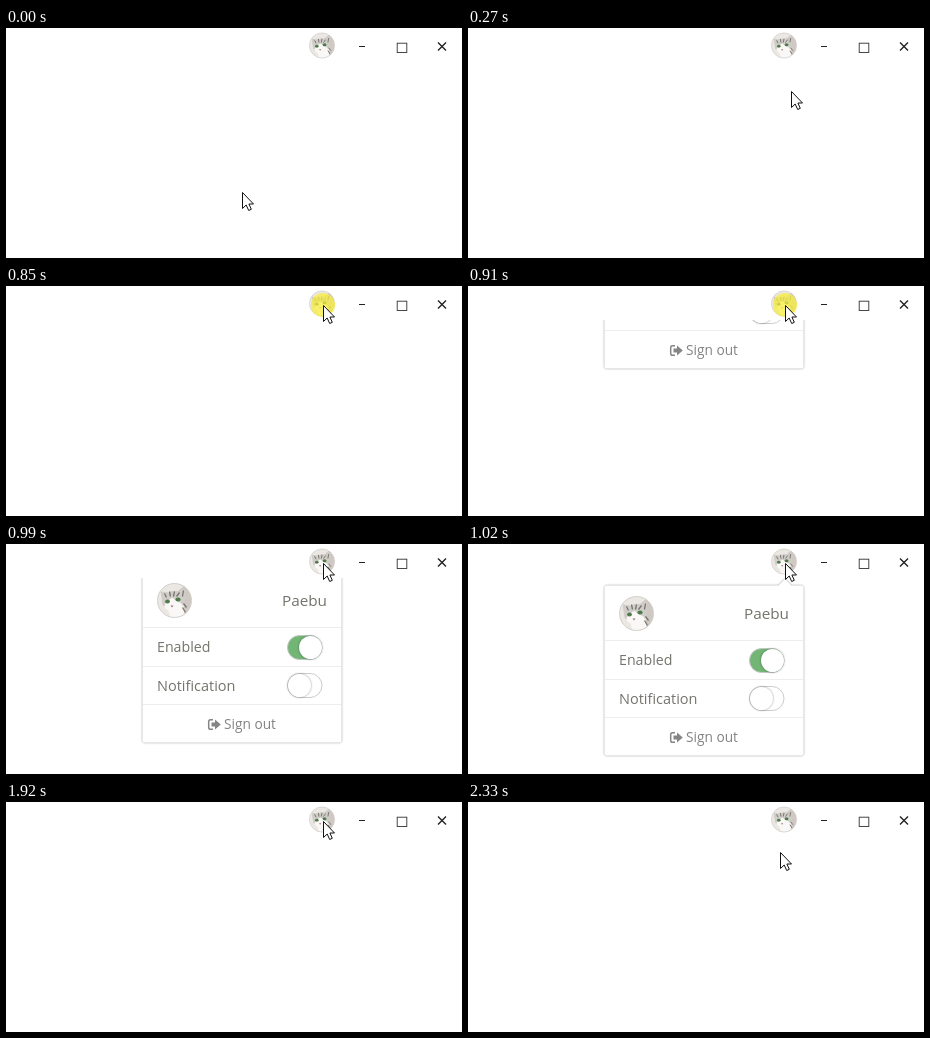
These frames come from a looping animation (456 by 230 pixels, 2540 ms). An HTML page:

```html
<!DOCTYPE html>
<html lang="en">
<head>
<meta charset="utf-8">
<title>Account menu</title>
<style>
  html, body { margin: 0; width: 100%; height: 100%; overflow: hidden; background: #fff; }
  svg { display: block; width: 100%; height: 100%; }
  text { font-family: "Open Sans", "Noto Sans", sans-serif; fill: #74736c; }
  .panel { filter: drop-shadow(0 0 1.3px rgba(0, 0, 0, .4)); }
  .knob { fill: #fff; filter: drop-shadow(0 .5px 1px rgba(0, 0, 0, .4)); }
</style>
</head>
<body>
<svg viewBox="0 0 456 230">
  <defs>
    <clipPath id="round"><circle r="17"/></clipPath>
    <clipPath id="below"><rect y="34" width="456" height="196"/></clipPath>
    <g id="avatar">
      <g clip-path="url(#round)">
        <rect x="-17" y="-17" width="34" height="34" fill="#ebe7e3"/>
        <path d="M3 -9L11 -16L17 -6V17H6L10 4Z" fill="#cfc8c3"/>
        <path d="M-14 -9L-6 -8Q0 -11 5 -9L9 -14L11 -3Q11 6 3 9Q-7 11 -12 4Z" fill="#d0cdc9"/>
        <path d="M-6 0Q-2 -5 1 0L7 3Q12 11 9 17H-4L-6 10Q-12 7 -9 3Z" fill="#faf8f6"/>
        <path d="M-10 -7L-8 -3M-5 -9L-4 -4M0 -9L-1 -4M5 -8L2 -4M9 -10L8 -4M9 3L12 7M8 7L11 12" stroke="#777470" stroke-width="1.3"/>
        <ellipse cx="-7" cy="1" rx="2.4" ry="2" fill="#4f7a4c"/>
        <ellipse cx="3.5" cy="-1" rx="2.6" ry="2.1" fill="#4f7a4c"/>
        <path d="M-4 5H-1L-2.500 7Z" fill="#8d7771"/>
      </g>
      <circle r="17" fill="none" stroke="#d3cfcb"/>
    </g>
  </defs>

  <g fill="none" stroke="#222">
    <path d="M353 18.5H359"/>
    <rect x="391.2" y="15.2" width="9.6" height="9.3" stroke="#333" stroke-width=".9"/>
    <path d="M432 14.5L440 22.5M440 14.5L432 22.5" stroke-width="1.4"/>
  </g>
  <use href="#avatar" transform="translate(316 17.5) scale(.74)"/>

  <g clip-path="url(#below)">
    <g id="menu">
      <path class="panel" d="M139 41.5H310.5L317 35L323.5 41.5H333Q335.5 41.5 335.5 44V209Q335.5 211.5 333 211.5H139Q136.5 211.5 136.5 209V44Q136.5 41.5 139 41.5Z" fill="#fff"/>
      <path d="M137 96.5H335M137 135.5H335M137 173.5H335" stroke="#ededed"/>
      <use href="#avatar" x="168.5" y="69.5"/>
      <text x="321" y="75" font-size="15.3" text-anchor="end">Paebu</text>
      <text x="151" y="121" font-size="14.2">Enabled</text>
      <text x="151" y="160" font-size="14.5">Notification</text>
      <rect x="281.5" y="104.5" width="34.5" height="24" rx="12" fill="#72b575" stroke="#c0c8c0"/>
      <circle class="knob" cx="304.5" cy="116.5" r="11.5"/>
      <rect x="281.5" y="142.5" width="34.5" height="24" rx="12" fill="#fff" stroke="#ccc"/>
      <circle class="knob" cx="293.5" cy="154.5" r="11.5"/>
      <path d="M207 188.7H204.5Q202.7 188.7 202.7 190.5V196.5Q202.7 198.3 204.5 198.3H207" fill="none" stroke="#858585" stroke-width="1.5"/>
      <path d="M205.5 191.5H209V188.5L214.8 193.5L209 198.5V195.5H205.5Z" fill="#858585"/>
      <text x="218" y="198" font-size="13.7" style="fill:#828282">Sign out</text>
    </g>
  </g>

  <circle id="click" cx="317" cy="19" r="12" fill="#f8ee3c" fill-opacity=".75"/>
  <path id="cursor" d="M.5 .5V16.5L4.2 13L6.7 18.5L9.3 17.3L6.9 12H11.5Z" fill="#fff" stroke="#111"/>
</svg>
<script>
  const LOOP = 2540, TRAVEL = 180;
  const [menu, click, cursor] = ["menu", "click", "cursor"].map(id => document.getElementById(id));
  const progress = (t, from, to) => Math.min(1, Math.max(0, (t - from) / (to - from)));
  const swing = p => .5 - Math.cos(Math.PI * p) / 2;
  const between = (t, from, to) => t >= from && t < to;

  function pointer(t) {
    if (t >= 2130) {
      const p = swing(progress(t, 2130, 2330));
      return [317 - 5 * p, 19 + 31 * p];
    }
    // Swings out to the right, then settles back onto the avatar.
    const p = 1 - (1 - progress(t, 20, 560)) ** 1.92;
    const turn = .697;
    const x = p < turn ? 323 - 87 * (1 - p / turn) ** 2
                       : 323 - 6 * ((p - turn) / (1 - turn)) ** 2;
    return [x, 164 - 145 * p];
  }

  function draw(now) {
    const t = now % LOOP;
    const open = t < 1820 ? swing(progress(t, 850, 1020)) : 1 - swing(progress(t, 1820, 1920));
    menu.setAttribute("transform", `translate(0 ${Math.round(TRAVEL * (open - 1))})`);
    menu.style.display = open > 0 ? "" : "none";
    click.style.display = between(t, 850, 980) || between(t, 1820, 1920) ? "" : "none";
    cursor.setAttribute("transform", `translate(${pointer(t).map(Math.round)})`);
  }

  const start = performance.now();
  function tick() {
    draw(performance.now() - start);
    requestAnimationFrame(tick);
  }
  tick();
</script>
</body>
</html>
```
